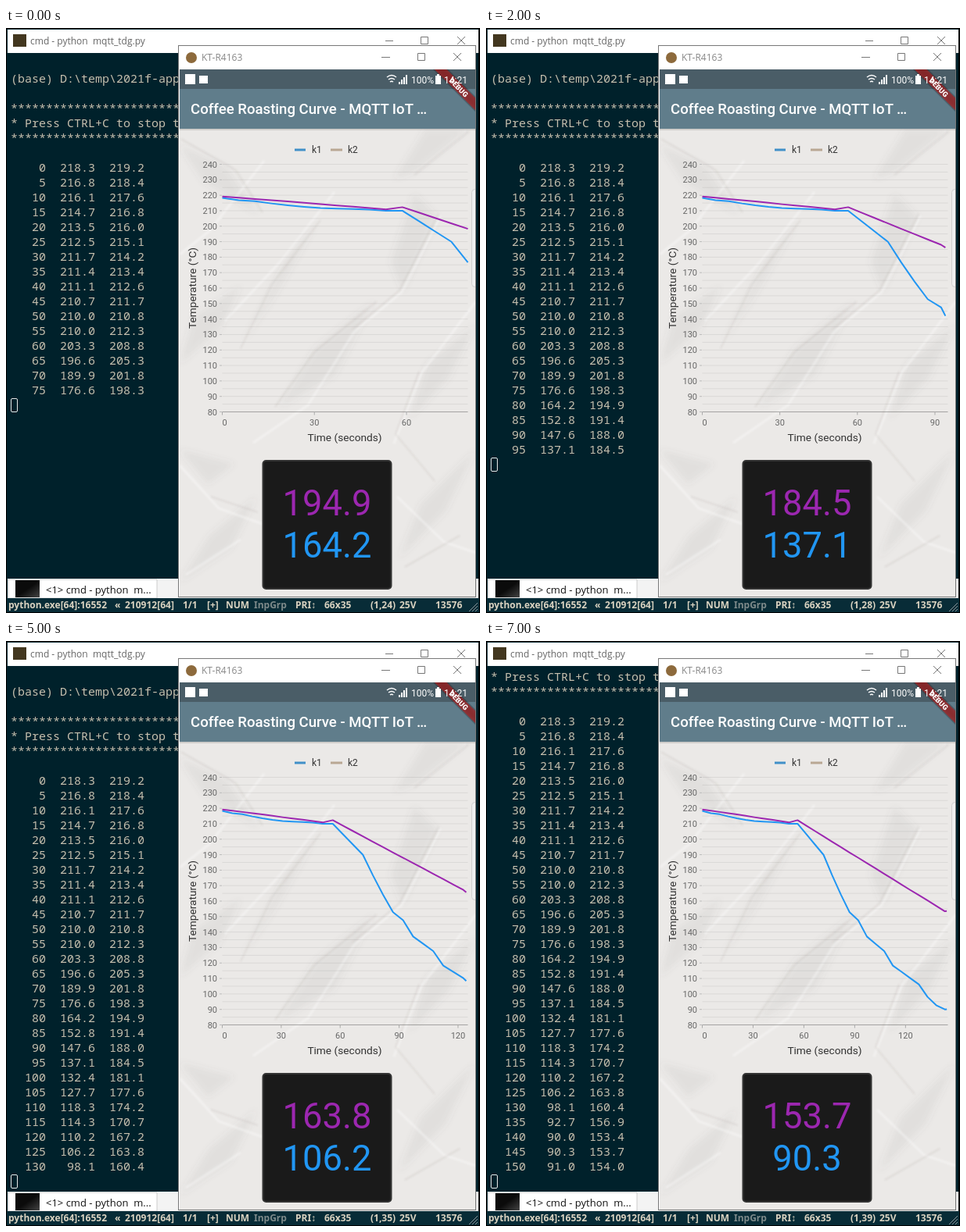
Animation of 606x749 px, one loop 8 s. Source, as an HTML page:

```html
<!DOCTYPE html>
<html lang="en">
<head>
<meta charset="utf-8">
<title>Roasting curve</title>
<style>
  html, body { margin: 0; width: 100%; height: 100%; overflow: hidden; background: #000; }
  svg { display: block; width: 606px; height: 749px; font-family: Roboto, sans-serif; }
  text { white-space: pre; }
  .ui { font: 12px "Open Sans", sans-serif; }
  .tab { font: 13px "Open Sans", sans-serif; }
  .term { font: 15px "Noto Sans Mono", monospace; fill: #c6bfae; }
  .status { font: bold 12px "Noto Sans", sans-serif; fill: #d9d2c0; }
  .btn { fill: none; stroke: #777; }
  .axis { font-size: 11px; fill: #666; }
  .title { font-size: 13.7px; fill: #333; text-anchor: middle; }
  .big { font-size: 45.3px; text-anchor: middle; }
  .line { fill: none; stroke-width: 2; stroke-linejoin: round; }
</style>
</head>
<body>
<svg viewBox="0 0 606 749">
  <defs>
    <clipPath id="termClip"><rect x="2" y="37" width="219" height="667"/></clipPath>
    <clipPath id="phoneClip"><rect x="222" y="53" width="378" height="675"/></clipPath>
    <filter id="soft"><feGaussianBlur stdDeviation="4"/></filter>
    <filter id="crisp"><feGaussianBlur stdDeviation="1.2"/></filter>
    <linearGradient id="thumb" x2="1" y2="1">
      <stop offset=".5" stop-color="#0b0b0b"/><stop offset="1" stop-color="#444"/>
    </linearGradient>
  </defs>

  <!-- console window -->
  <rect x="1" y="1" width="603" height="748" fill="#00212b"/>
  <rect x="2" y="2" width="602" height="30" fill="#fff"/>
  <rect x="9" y="8" width="17" height="16" fill="#43371f"/>
  <text class="ui" x="31" y="21" fill="#666">cmd - python  mqtt_tdg.py</text>
  <path class="btn" d="M485 16.5h10M530.500 11.500h9v9h-9zM577 11l10 10m0-10l-10 10"/>
  <g clip-path="url(#termClip)"><g id="term" class="term"></g></g>
  <rect x="2" y="705" width="602" height="25" fill="#f3f3f3"/>
  <path d="M3 706h190v24H3z" fill="#fff" stroke="#ccc"/>
  <rect x="12" y="707" width="31" height="22" fill="url(#thumb)"/>
  <text class="tab" x="51" y="724" fill="#111">&lt;1&gt; cmd - python  m...</text>
  <rect x="1" y="730" width="604" height="19" fill="#082c37"/>
  <g id="status" class="status"></g>
  <path d="M592 747l11-11m-7 11l7-7m-3 7l3-3" stroke="#8b9a9d"/>

  <!-- phone window -->
  <rect x="220.500" y="22.500" width="380" height="706" fill="#fff" stroke="#777"/>
  <circle cx="237" cy="38" r="7" fill="#8d6a3c"/>
  <text class="ui" x="250" y="42" fill="#888">KT-R4163</text>
  <path class="btn" d="M480 37.500h11M526.500 32.500h9v9h-9zM572 32l10 10m0-10l-10 10"/>

  <g clip-path="url(#phoneClip)">
    <rect x="222" y="129" width="379" height="600" fill="#ebe9e7"/>
    <g fill="#756c64" fill-opacity=".08" filter="url(#soft)">
      <path d="M522 212l30 30-45 95-15-38z"/>
      <path d="M398 248l-40 50-55 105 44-66z"/>
      <path d="M222 150l60 28 40 60-70-42z"/>
      <path d="M590 130l-64 52-30 12 40-64z"/>
      <path d="M470 350l-75 60-45 75 70-40z"/>
      <path d="M300 330l-60 40-18 60 52-45z"/>
      <path d="M600 380l-62 50-22 70 50-52z"/>
      <path d="M222 540l70 18-34 26z"/>
      <path d="M600 540l-70 70-28 70 60-62z"/>
      <path d="M320 600l-60 50-38 60 66-44z"/>
    </g>
    <g fill="none" stroke="#fff" stroke-opacity=".35" stroke-width="3" filter="url(#crisp)">
      <path d="M556 240l-50 98-60 50-60 95-70 48M330 170l-70 90-38 30M420 210l-70 90-70 75"/>
      <path d="M601 350l-70 92-35 90M222 560l50 55 56 20M500 600l60 58 41 14M230 700l70-45"/>
    </g>
    <g fill="none" stroke="#6f665e" stroke-opacity=".12" stroke-width="1.500" filter="url(#crisp)">
      <path d="M553 238l-50 98-60 50M402 246l-62 82-40 82M224 142l70 40 34 54M592 132l-70 56"/>
      <path d="M474 350l-80 65-50 70M528 440l-30 80 50 60M262 600l60 20M510 690l70-40"/>
    </g>
    <rect x="222" y="53" width="379" height="25" fill="#4a5d67"/>
    <rect x="222" y="78" width="379" height="51" fill="#607d8b"/>
    <rect x="222" y="129" width="379" height="2" fill="#000" opacity=".12"/>
    <text x="236" y="110" font-size="18.600" font-weight="500" fill="#fff">Coffee Roasting Curve - MQTT IoT …</text>
    <g transform="translate(578.800 76.200) rotate(45)">
      <rect x="-50" y="-5.500" width="100" height="11" fill-opacity=".5" filter="url(#soft)"/>
      <rect x="-50" y="-5.500" width="100" height="11" fill="#b71c1c" fill-opacity=".63"/>
      <text y="3.400" font-size="9.300" font-weight="900" fill="#fff" text-anchor="middle">DEBUG</text>
    </g>
    <g fill="#fff">
      <rect x="229" y="59" width="13" height="13"/>
      <rect x="247" y="61" width="11" height="10"/>
      <path d="M487 63q6-5 12 0M489 66q4-3 8 0M491 69q2-1.500 4 0" fill="none" stroke="#fff" stroke-width="1.500"/>
      <path d="M502 69h2v3h-2zM505 66h2v6h-2zM508 63h2v9h-2zM511 60h2v12h-2zM549 61h2v-2h3v2h2v11h-7z"/>
      <text x="518" y="71" font-size="12">100%</text>
      <text x="560" y="71" font-size="12">14:21</text>
    </g>
    <rect x="595.500" y="206.500" width="10" height="125" rx="4" fill="#f0f0f0" stroke="#cfcfcf"/>

    <path d="M369 156h14" stroke="#4190c8" stroke-width="3"/>
    <path d="M415 156h15" stroke="#b9a793" stroke-width="3"/>
    <text x="391" y="160" font-size="12" fill="#333">k1</text>
    <text x="437" y="160" font-size="12" fill="#333">k2</text>
    <g id="grid"></g>
    <g id="ticks" class="axis"></g>
    <text class="title" x="433" y="529">Time (seconds)</text>
    <text class="title" transform="translate(243 333) rotate(-90)">Temperature (°C)</text>
    <path id="blue" class="line" stroke="#2196f3"/>
    <path id="purple" class="line" stroke="#9c27b0"/>

    <rect x="328.500" y="554" width="164" height="164" rx="4" fill="#1a1a1a" stroke="#343434" stroke-width="2"/>
    <text id="top" class="big" x="410.500" y="624" fill="#9c27b0"></text>
    <text id="low" class="big" x="410.500" y="678" fill="#2196f3"></text>
  </g>
  <rect x=".5" y=".5" width="605" height="748" fill="none" stroke="#000"/>
</svg>

<script>
const $ = id => document.getElementById(id);

// one reading every five seconds
const k1 = [218.3, 216.8, 216.1, 214.7, 213.5, 212.5, 211.7, 211.4, 211.1, 210.7, 210, 210, 203.3, 196.6, 189.9,
  176.6, 164.2, 152.8, 147.6, 137.1, 132.4, 127.7, 118.3, 114.3, 110.2, 106.2, 98.1, 92.7, 90, 90.3, 91];
const k2 = [219.2, 218.4, 217.6, 216.8, 216, 215.1, 214.2, 213.4, 212.6, 211.7, 210.8, 212.3, 208.8, 205.3, 201.8,
  198.3, 194.9, 191.4, 188, 184.5, 181.1, 177.6, 174.2, 170.7, 167.2, 163.8, 160.4, 156.9, 153.4, 153.7, 154];

// per second: printed rows, index of the newest charted reading, progress of its transition
const steps = [[16, 16, 0], [18, 17, .5], [20, 19, .53], [23, 21, .5],
  [25, 23, .48], [27, 25, .46], [29, 27, .43], [31, 29, .36]];

const LEFT = 276.5, WIDTH = 314, ROW = 19, MAX_ROWS = 27;
const yOf = v => 174.5 + (240 - v) * 317 / 160;
const mix = (a, b, p) => a + (b - a) * p;
const text = (x, y, s, attrs = '') => `<text x="${x}" y="${y}" ${attrs}>${s}</text>`;

function drawGrid() {
  let out = '';
  for (let v = 80; v <= 240; v += 5) {
    const y = yOf(v), major = v % 10 === 0;
    out += `<path d="M${LEFT} ${y}h${WIDTH}" stroke="#000" stroke-opacity="${v === 80 ? .3 : .075}"/>`;
    if (major) out += `<path d="M273 ${y}h3" stroke="#bbb"/>` + text(270, y + 4, v, 'class="axis" text-anchor="end"');
  }
  $('grid').innerHTML = out;
}

function drawTerm(rows) {
  const stars = '*'.repeat(26);
  const lines = ['(base) D:\\temp\\2021f-app', '', stars, '* Press CTRL+C to stop the', stars, ''];
  for (let i = 0; i < rows; i++) {
    lines.push(String(i * 5).padStart(5) + [k1, k2].map(k => k[i].toFixed(1).padStart(7)).join(''));
  }
  const shift = Math.max(0, rows - MAX_ROWS) * ROW;
  const cursorY = 65 + lines.length * ROW - shift;
  $('term').innerHTML = lines.map((s, i) => text(6, 70 + i * ROW - shift, s)).join('') +
    `<rect x="6.5" y="${cursorY - 8.5}" width="8" height="17" rx="1.500" fill="none" stroke="#e8e8e8"/>`;
}

function drawStatus(rows) {
  const parts = [[3, 'python.exe[64]:16552'], [139, '«'], [152, '210912[64]'], [226, '1/1'], [257, '[+]'],
    [281, 'NUM'], [317, 'InpGrp', 'fill="#7d8a8a"'], [370, 'PRI↕'], [407, '66x35'],
    [466, `(1,${rows + 8})`], [503, '25V'], [549, '13576']];
  $('status').innerHTML = parts.map(([x, s, a]) => text(x, 743, s, a)).join('');
}

function curve(k, last, p) {
  const pts = k.slice(0, last).map((v, i) =>
    [LEFT + WIDTH * mix(i / (last - 1), i / last, p), yOf(v)]);
  pts.push([LEFT + WIDTH - .36 * p * WIDTH / last, yOf(mix(k[last - 1], k[last], p))]);
  return 'M' + pts.map(pt => pt.map(n => n.toFixed(2)).join(' ')).join('L');
}

function drawTicks(span) {
  let out = '';
  for (let s = 0; s <= span; s += 30) {
    const x = LEFT + WIDTH * s / span;
    out += `<path d="M${x} 491.500v4" stroke="#aaa"/>` +
      text(x, 509, s, `text-anchor="${s ? 'middle' : 'start'}"`);
  }
  $('ticks').innerHTML = out;
}

function draw([rows, last, p]) {
  drawTerm(rows);
  drawStatus(rows);
  drawTicks(last * 5);
  $('blue').setAttribute('d', curve(k1, last, p));
  $('purple').setAttribute('d', curve(k2, last, p));
  $('top').textContent = k2[last].toFixed(1);
  $('low').textContent = k1[last].toFixed(1);
}

let shown = -1;
function tick() {
  const now = Math.floor(performance.now() % 8000 / 1000);
  if (now !== shown) draw(steps[shown = now]);
  requestAnimationFrame(tick);
}
drawGrid();
tick();
</script>
</body>
</html>
```
